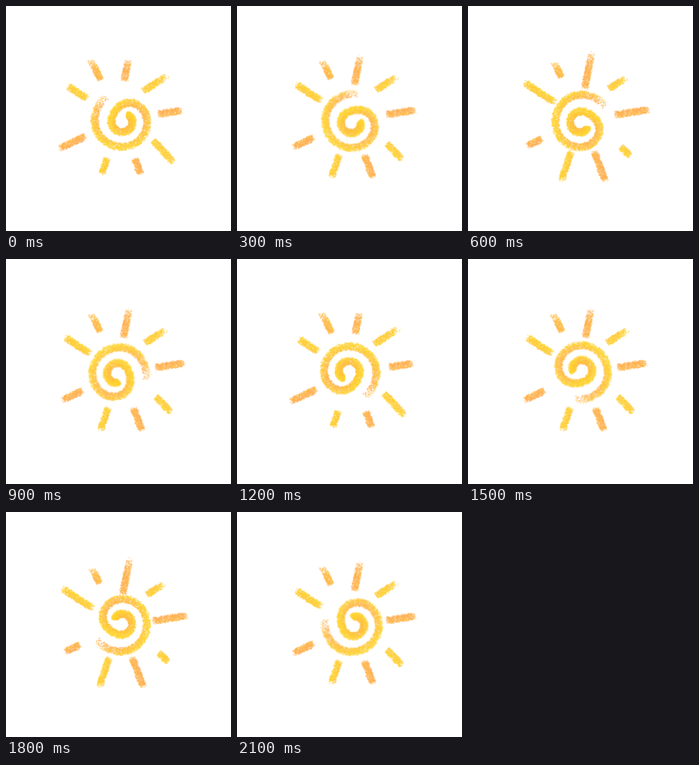
An HTML page with a canvas that plays this animation: 282x282 px, repeating every 2400 ms.

```html
<!DOCTYPE html>
<html lang="en">
<head>
<meta charset="utf-8">
<title>Crayon sun</title>
<style>
html, body { margin: 0; width: 100%; height: 100%; overflow: hidden; background: #fff; }
canvas { position: absolute; left: 0; top: 0; width: 100%; height: 100%; filter: blur(0.45px); }
#spiral { left: 95px; top: 95px; width: 96px; height: 96px; animation: spin 2.4s steps(8, end) infinite; }
#pose0 { animation: first 1.2s step-end infinite; }
#pose1 { animation: between 1.2s step-end infinite; }
#pose2 { animation: last 1.2s step-end infinite; }
@keyframes spin { to { transform: rotate(360deg); } }
@keyframes first { 0% { opacity: 1; } 25%, 100% { opacity: 0; } }
@keyframes between { 0%, 50% { opacity: 0; } 25%, 75%, 100% { opacity: 1; } }
@keyframes last { 0%, 75%, 100% { opacity: 0; } 50% { opacity: 1; } }
</style>
</head>
<body>
<canvas id="pose0"></canvas>
<canvas id="pose1"></canvas>
<canvas id="pose2"></canvas>
<canvas id="spiral"></canvas>
<script>
const YELLOW = [255, 211, 46], ORANGE = [254, 171, 82];
const SCALE = 2, RAD = Math.PI / 180;

function seeded(seed) {
  return () => {
    seed = (seed + 0x6d2b79f5) | 0;
    let h = Math.imul(seed ^ (seed >>> 15), seed | 1);
    h ^= h + Math.imul(h ^ (h >>> 7), h | 61);
    return ((h ^ (h >>> 14)) >>> 0) / 4294967296;
  };
}

// A canvas context with its origin in the middle of the sun
function layer(id, size, middle) {
  const canvas = document.getElementById(id);
  canvas.width = canvas.height = size * SCALE;
  const ctx = canvas.getContext('2d');
  ctx.scale(SCALE, SCALE);
  ctx.translate(middle, middle);
  return ctx;
}

// Fills a stroke with soft grains; tint(s, u) is the share of orange,
// with s along the stroke and u across it.
function crayon(ctx, rnd, { at, length, width, tint, fadeIn, fadeOut }) {
  const count = length * width * 3;
  for (let i = 0; i < count; i++) {
    const s = rnd(), u = rnd() * 2 - 1, grain = rnd();
    const ends = Math.min(1, s / fadeIn, (1 - s) / fadeOut);
    const edge = Math.min(1, (1 - Math.abs(u)) / 0.4);
    if (rnd() > ends * edge) continue;
    const mix = Math.max(0, Math.min(1, tint(s, u) + (rnd() - 0.5) * 0.4));
    const [x, y] = at(s), [x0, y0] = at(s - 0.004), [x1, y1] = at(s + 0.004);
    const dx = x1 - x0, dy = y1 - y0, off = u * width / 2 / Math.hypot(dx, dy);
    const rgb = YELLOW.map((c, k) => Math.round(c + (ORANGE[k] - c) * mix));
    ctx.fillStyle = `rgba(${rgb},${0.25 + grain * 0.25})`;
    ctx.beginPath();
    ctx.arc(x + dy * off, y - dx * off, 0.5 + grain * 0.5, 0, 7);
    ctx.fill();
  }
}

// Rays sit on a ring and stretch or shrink about their own middle.
const rays = [
  { angle: -116, radius: 70, length: 31, grow: -4, orange: 0.65 },
  { angle: -83, radius: 63, length: 29, grow: 10, orange: 0.85, lean: 4 },
  { angle: -46, radius: 64, length: 39, grow: -6, orange: 0.15, lean: 13 },
  { angle: -9, radius: 63, length: 31, grow: 7, orange: 0.85 },
  { angle: 36, radius: 67, length: 40, grow: -11, orange: 0.1, lean: 11 },
  { angle: 69, radius: 62, length: 22, grow: 10, orange: 0.85 },
  { angle: 109, radius: 61, length: 23, grow: 9, orange: 0.15 },
  { angle: 155, radius: 66, length: 38, grow: -8, orange: 0.85 },
  { angle: 213, radius: 64, length: 31, grow: 9, orange: 0.12 }
];

function drawRays(step) {
  const ctx = layer('pose' + step, 282, 143);
  rays.forEach(({ angle, radius, length, grow, orange, lean = 0 }, i) => {
    const ring = angle * RAD, dir = (angle + lean) * RAD;
    const size = length + grow * step;
    crayon(ctx, seeded(i + 1), {
      at: s => [
        Math.cos(ring) * radius + Math.cos(dir) * size * (s - 0.5),
        Math.sin(ring) * radius + Math.sin(dir) * size * (s - 0.5)
      ],
      length: size,
      width: 10,
      tint: (s, u) => orange + u * 0.15,
      fadeIn: 0.12,
      fadeOut: Math.sin(ring) < -0.7 ? 0.45 : 0.16
    });
  });
}

// Quarter turns along the spiral, counted from its leftmost point
const quarters = s => -0.6 + 7.4 * s * (0.6 + 0.4 * s);

// Spiral about a point right of the pivot, flattened where it first turns inward
function spiral(s) {
  const q = quarters(s), angle = Math.PI - q * Math.PI / 2;
  const r = Math.min(37, 38 - 4.6 * q) - 6 * Math.exp(-2 * (q - 3.5) ** 2);
  return [5 + r * Math.cos(angle), r * Math.sin(angle)];
}

function drawSpiral() {
  crayon(layer('spiral', 96, 48), seeded(40), {
    at: spiral,
    length: 280,
    width: 11,
    tint: (s, u) => {
      const wave = Math.cos(2 * Math.PI * (quarters(s) + 0.6) / 2.9);
      return (0.4 + 0.35 * wave) * (1 - 0.6 * s) + u * 0.35;
    },
    fadeIn: 0.13,
    fadeOut: 0.02
  });
}

[0, 1, 2].forEach(drawRays);
drawSpiral();
</script>
</body>
</html>
```
